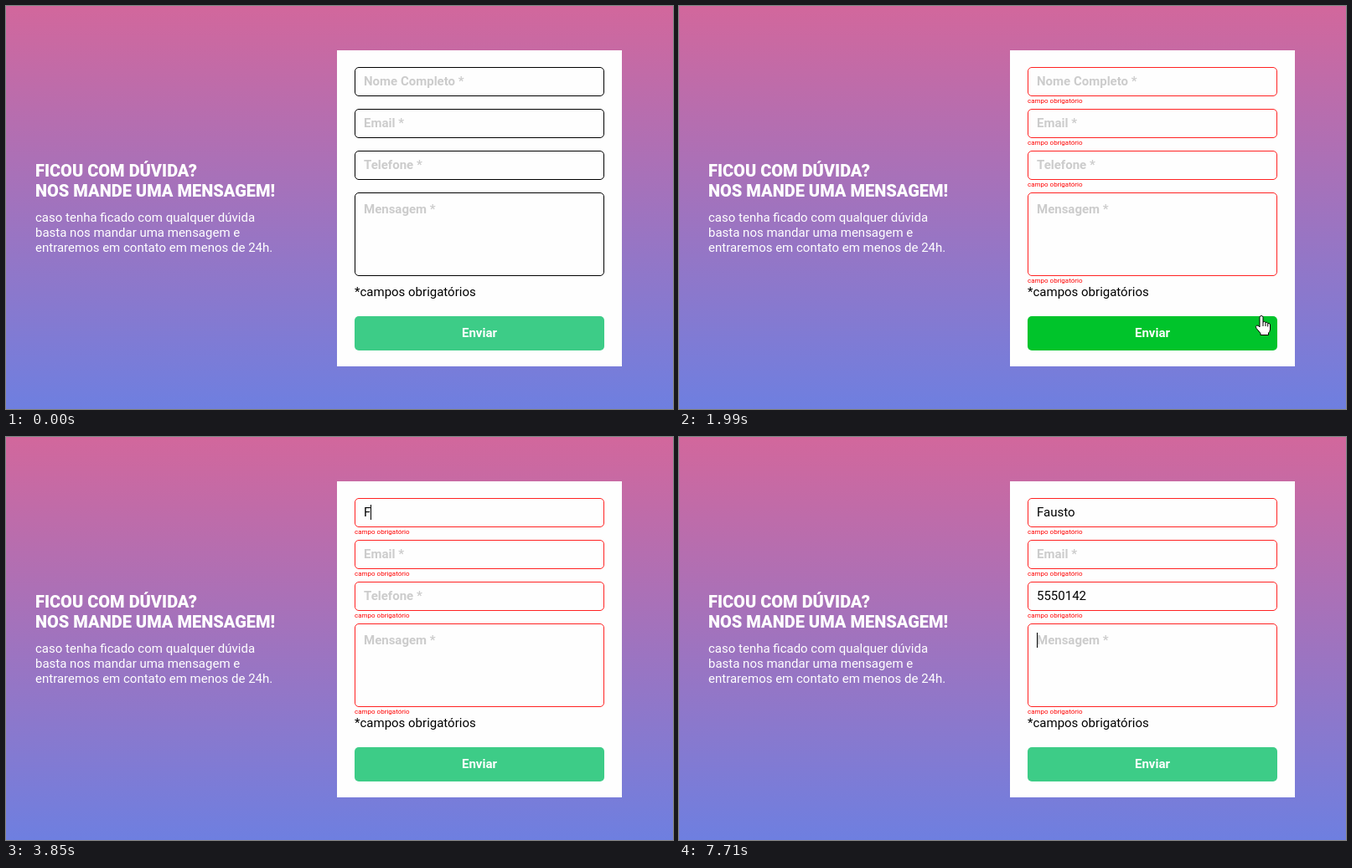
These frames come from a looping animation (796x482 px, 8 s). An HTML page:

```html
<!DOCTYPE html>
<html lang="pt-BR">
<head>
<meta charset="utf-8">
<title>Formulário de contato</title>
<style>
  html, body { margin: 0; width: 100%; height: 100%; overflow: hidden; }
  body { position: relative; background: linear-gradient(#d2679c, #6e7fe0); font: 15px/18px Roboto, Arial, sans-serif; color: #000; }
  body * { box-sizing: border-box; }
  .abs, .field, .error { position: absolute; white-space: nowrap; }
  h1 { left: 35px; top: 185px; margin: 0; font-size: 20px; line-height: 24px; font-weight: 900; color: #fff; }
  p { left: 35px; top: 244px; margin: 0; color: #fff; }
  .card { left: 395px; top: 53px; width: 340px; height: 378px; background: #fefefe; }
  .field { left: 416px; width: 298px; border: 1px solid #000; border-radius: 5px; padding: 7px 10px; }
  .field.area { padding-top: 10px; }
  .error { left: 416px; margin-top: 1px; font-size: 8px; line-height: 9px; color: #f00; visibility: hidden; }
  .invalid .field { border-color: #f22; }
  .invalid .error { visibility: visible; }
  .caret { display: inline-block; width: 1px; height: 18px; margin-right: -1px; vertical-align: top; background: #000; }
  .hint { font-weight: 700; color: #ccc; }
  .note { left: 416px; top: 333px; }
  .send { left: 416px; top: 371px; width: 298px; height: 41px; border-radius: 5px; background: #3dcc87; color: #fff; font-weight: 700; line-height: 40px; text-align: center; }
  .send.hover { background: #00c42b; }
  svg { position: absolute; left: 0; top: 0; width: 796px; height: 482px; }
</style>
</head>
<body>
<h1 class="abs">FICOU COM DÚVIDA?<br>NOS MANDE UMA MENSAGEM!</h1>
<p class="abs">caso tenha ficado com qualquer dúvida<br>basta nos mandar uma mensagem e<br>entraremos em contato em menos de 24h.</p>
<div class="abs card"></div>
<div id="form"></div>
<div class="abs note">*campos obrigatórios</div>
<div class="abs send" id="send">Enviar</div>
<svg viewBox="0 0 796 482">
  <g id="pointer" stroke="#000" stroke-linejoin="round">
    <path id="arrow" fill="#fff" d="M.5.5V16.5L4.3 13 6.8 18.5 9 17.5 6.6 12.2H11.7Z"/>
    <g id="hand" transform="translate(1 0)">
      <path fill="#fff" d="M-2 13V1.5Q-2-.5 0-.5Q2-.5 2 1.5V7Q4 5.5 5 7.5Q7 6.5 7.5 8.5Q10 8 10.5 10V16Q10 19 8.5 20V22.5H-1V20.5L-6 14.5Q-7.5 12-5.5 11Q-4 10.5-2 13Z"/>
      <path fill="none" d="M2 7V12M5 8V12M7.7 9V12.5"/>
    </g>
    <path id="beam" fill="none" d="M-2.5-7.5H-.5M1.5-7.5H3.5M.5-7V7M-2.5 7.5H-.5M1.5 7.5H3.5"/>
  </g>
</svg>
<script>
const LOOP = 8000;
const ERRORS_AT = 1240;
const KEY_GAP = 200;
const BLINK = 530;
const $ = id => document.getElementById(id);

const fields = [
  { hint: 'Nome Completo *', text: 'Fausto', focus: 3450, typing: 3850 },
  { hint: 'Email *', text: '', focus: 5240 },
  { hint: 'Telefone *', text: '5550142', focus: 5440, typing: 6310 },
  { hint: 'Mensagem *', text: '', focus: 7700, area: true }
];

function add(parent, tag, cls, text = '') {
  const el = document.createElement(tag);
  el.className = cls;
  el.textContent = text;
  return parent.appendChild(el);
}

fields.forEach((f, i) => {
  f.top = 73 + 50 * i;
  f.height = f.area ? 100 : 35;
  const box = add($('form'), 'div', f.area ? 'field area' : 'field');
  box.style.top = f.top + 'px';
  box.style.height = f.height + 'px';
  f.value = add(box, 'span', 'value');
  f.caret = add(box, 'i', 'caret');
  f.label = add(box, 'span', 'hint', f.hint);
  add($('form'), 'div', 'error', 'campo obrigatório').style.top = f.top + f.height + 'px';
});

// Each glide follows a cubic curve through its control points.
const POINTER_IN = 500, POINTER_OUT = 3850;
const glides = [
  { from: 500, to: 830, x: [766, 720, 660, 633], y: [366, 372, 386, 386] },
  { from: 1907, to: 2320, x: [633, 730, 870, 693], y: [386, 400, 200, 92] },
  { from: 2320, to: 2720, x: [693, 650, 620, 618], y: [92, 70, 70, 85] },
  { from: 2920, to: 3250, x: [618, 616, 616, 618], y: [85, 96, 94, 90] }
];

const clamp = (v, lo, hi) => Math.min(hi, Math.max(lo, v));
const bezier = ([a, b, c, d], u) => {
  const v = 1 - u;
  return a * v ** 3 + 3 * b * v * v * u + 3 * c * v * u * u + d * u ** 3;
};
const inside = (x, y, top, height) => x >= 416 && x < 714 && y >= top && y < top + height;
const show = (el, on) => { el.style.display = on ? '' : 'none'; };

function drawPointer(t) {
  const visible = t >= POINTER_IN && t < POINTER_OUT;
  show($('pointer'), visible);
  $('send').classList.remove('hover');
  if (!visible) return;

  const g = glides.findLast(s => s.from <= t);
  const u = clamp((t - g.from) / (g.to - g.from), 0, 1);
  const x = Math.round(bezier(g.x, u)), y = Math.round(bezier(g.y, u));
  const onSend = inside(x, y, 371, 41);
  const onField = fields.some(f => inside(x, y, f.top, f.height));
  $('send').classList.toggle('hover', onSend);
  $('pointer').setAttribute('transform', `translate(${x} ${y})`);
  show($('hand'), onSend);
  show($('beam'), onField);
  show($('arrow'), !onSend && !onField);
}

function drawFields(t) {
  const active = fields.findLast(f => f.focus <= t);
  $('form').classList.toggle('invalid', t >= ERRORS_AT);
  for (const f of fields) {
    const count = f.typing ? Math.max(0, Math.floor((t - f.typing) / KEY_GAP) + 1) : 0;
    const typed = f.text.slice(0, count);
    if (f.value.textContent !== typed) f.value.textContent = typed;
    show(f.caret, f === active && (t - f.focus) % (2 * BLINK) < BLINK);
    show(f.label, !typed);
  }
}

const start = performance.now();
function tick() {
  const t = (performance.now() - start) % LOOP;
  drawPointer(t);
  drawFields(t);
  requestAnimationFrame(tick);
}
tick();
</script>
</body>
</html>
```
